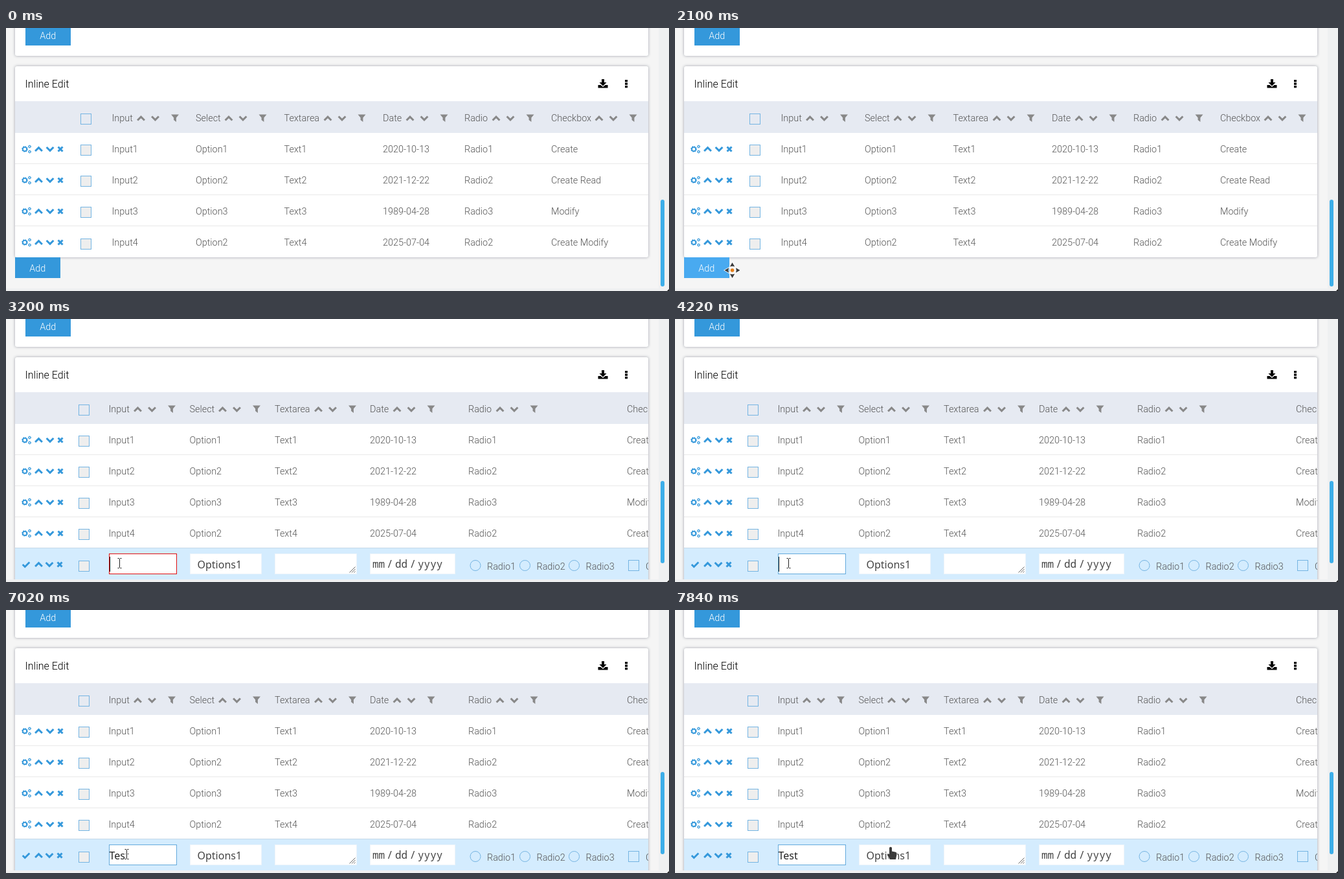
Recreate the animation shown at these times as an HTML page with a canvas. Size 1024x406 px, loop 8000 ms.

```html
<!DOCTYPE html>
<html lang="en">
<head>
<meta charset="utf-8">
<title>Inline Edit</title>
<style>
html, body { margin: 0; height: 100%; overflow: hidden; background: #f5f5f5; }
canvas { display: block; }
</style>
</head>
<body>
<canvas id="stage" width="1024" height="406"></canvas>
<script>
const ctx = document.getElementById('stage').getContext('2d');
const LOOP = 8000, BLUE = '#3498db', DARK = '#3b3b3b';
const LIGHT = '300 14.4px Roboto, sans-serif';
const FIELD = '16px "Noto Sans", sans-serif';
const MONO = '16px "Noto Sans Mono", monospace';

const heads = ['Input', 'Select', 'Textarea', 'Date', 'Radio', 'Checkbox'];
const rows = [
  ['Input1', 'Option1', 'Text1', '2020-10-13', 'Radio1', 'Create'],
  ['Input2', 'Option2', 'Text2', '2021-12-22', 'Radio2', 'Create Read'],
  ['Input3', 'Option3', 'Text3', '1989-04-28', 'Radio3', 'Modify'],
  ['Input4', 'Option2', 'Text4', '2025-07-04', 'Radio2', 'Create Modify']
];
const wideCols = [163.5, 293, 429.5, 582, 708, 842];
const editCols = [158.5, 283.5, 415, 562, 714, 959];
const sortGap = [45, 51, 67.5, 42, 49, 74];
const typing = [[4920, 'T'], [5720, 'Te'], [6020, 'Tes'], [6300, 'Test']];

const clamp = p => Math.max(0, Math.min(1, p));
const span = (t, a, b) => clamp((t - a) / (b - a));
const mix = (a, b, p) => a + (b - a) * p;

function text(s, x, y, font = LIGHT, color = '#555') {
  ctx.font = font;
  ctx.fillStyle = color;
  ctx.fillText(s, x, y);
}
function rect(x, y, w, h, fill) {
  ctx.fillStyle = fill;
  ctx.fillRect(x, y, w, h);
}
function box(x, y, w, h, fill, line) {
  rect(x, y, w, h, fill);
  ctx.strokeStyle = line;
  ctx.lineWidth = 1;
  ctx.strokeRect(x + .5, y + .5, w - 1, h - 1);
}
function shape(d, x, y, fill, line, width = 1) {
  const path = new Path2D(d);
  ctx.save();
  ctx.translate(x, y);
  if (line) {
    ctx.strokeStyle = line;
    ctx.lineWidth = width;
    ctx.stroke(path);
  }
  if (fill) {
    ctx.fillStyle = fill;
    ctx.fill(path);
  }
  ctx.restore();
}
function ring(x, y, r, line, width, dash = []) {
  ctx.beginPath();
  ctx.arc(x, y, r, 0, 7);
  ctx.setLineDash(dash);
  ctx.strokeStyle = line;
  ctx.lineWidth = width;
  ctx.stroke();
  ctx.setLineDash([]);
}
function card(y, h) {
  ctx.save();
  ctx.shadowColor = 'rgba(40,45,70,.42)';
  ctx.shadowBlur = 4;
  ctx.fillStyle = '#fff';
  ctx.beginPath();
  ctx.roundRect(14, y, 978, h, 3);
  ctx.fill();
  ctx.restore();
}
function button(x, y, fill) {
  rect(x, y, 70, 32, fill);
  text('Add', x + 22.3, y + 22, LIGHT, '#fff');
}

const up = (x, y, c) => shape('M-5.4 3L0-2.4 5.4 3', x, y, null, c, 3);
const down = (x, y, c) => shape('M-5.4-3L0 2.4 5.4-3', x, y, null, c, 3);
const cross = (x, y) => shape('M-3.5-3.5L3.5 3.5M3.5-3.5L-3.5 3.5', x, y, null, BLUE, 3);
const funnel = (x, y) => shape('M-6-5.5H6L1.9-.5V6L-1.9 3V-.5Z', x, y, '#888');
const check = (x, y) => box(x - 8.5, y - 8.5, 17, 17, '#eee', '#74b4e2');

function gear(x, y, r, width, teeth) {
  ring(x, y, r, BLUE, width);
  const step = 2 * Math.PI * (r + width / 2) / teeth;
  ring(x, y, r + width / 2, BLUE, width * .9, [step / 2, step / 2]);
}
function actions(y, editing) {
  if (editing) shape('M-5.3 0L-1.7 3.6 5.3-3.4', 31, y, null, BLUE, 2.8);
  else {
    gear(29, y, 3.1, 1.8, 8);
    gear(36.5, y - 4, 1.5, 1.1, 6);
    gear(36.5, y + 4, 1.5, 1.1, 6);
  }
  up(50.5, y, BLUE);
  down(68 - editing, y, BLUE);
  cross(84 - editing, y);
}

function table(editing) {
  const cols = editing ? editCols : wideCols;
  const checkX = editing ? 120.5 : 123.5;
  rect(14, 113, 978, 49, '#e6eaf2');
  box(checkX - 8.5, 132, 17, 17, '#e6eaf2', '#74b4e2');
  heads.forEach((name, i) => {
    const x = cols[i] + sortGap[i];
    text(name, cols[i], 144, LIGHT, '#555');
    up(x, 139.5, '#888');
    down(x + 22, 139.5, '#888');
    funnel(x + 52.5, 139);
  });
  rows.forEach((row, r) => {
    const y = 187 + 48 * r;
    if (r < 3) rect(14, y + 22, 978, 1, '#e9e9e9');
    actions(y, 0);
    check(checkX, y + (r === 3 && !editing ? 2.5 : 1.5));
    row.forEach((s, i) => text(s, cols[i], y + 5));
  });
}

function editRow(t) {
  rect(14, 353, 978, 49, '#d4ecfe');
  rect(14, 353, 978, 1, '#c6d9e8');
  actions(379, 1);
  check(120.5, 381.5);

  const p = span(t, 3200, 4220), e = p * p * (3 - 2 * p);
  const q = Math.sqrt(e) * .4 + e * .6;
  const edge = `rgb(${mix(224, 100, q)},${mix(16, 170, q)},${mix(16, 220, q)})`;
  box(159, 362, 105, 32, '#fff', edge);
  const typed = typing.reduce((s, [at, word]) => t >= at ? word : s, '');
  text(typed, 159.5, 385, FIELD, '#222');
  if (t >= 3200 && t < 6460) {
    rect(160 + Math.round(ctx.measureText(typed).width - (typed ? 1 : 0)), 367, 1, 23, '#111');
  }

  for (const [x, w] of [[284, 111], [415, 127], [562, 132]]) box(x, 362, w, 32, '#fff', '#edf4fa');
  text('Options1', 295.5, 385, FIELD, '#444');
  shape('M-9 0L0-9M-5.5 0L0-5.5M-2 0L0-2', 539.5, 391.5, null, '#666', 1);
  [['mm', 566], ['/', 588], ['dd', 601], ['/', 623.5], ['yyyy', 636]]
    .forEach(([s, x]) => text(s, x, 384, MONO, '#444'));
  [725, 801.5, 877.5].forEach((x, i) => {
    ring(x, 380.5, 8, '#74b4e2', 1);
    text('Radio' + (i + 1), x + 18, 387);
  });
  box(961, 372, 17, 17, '#d4ecfe', '#74b4e2');
  text('Create', 988, 387);
}

const cursors = {
  arrow(x, y) {
    shape('M0 0V16L4 12.5 6.5 18 9 17 6.5 11.5H12Z', x, y, DARK, '#fff', 2);
  },
  move(x, y) {
    for (let i = 0; i < 4; i++) {
      ctx.save();
      ctx.translate(x, y);
      ctx.rotate(i * Math.PI / 2);
      shape('M0-12L3.8-5.5Q0-7 -3.8-5.5Z', 0, 0, DARK, '#fff', 1.5);
      ctx.restore();
    }
    ctx.beginPath();
    ctx.arc(x, y, 2.8, 0, 7);
    ctx.fillStyle = '#e67e17';
    ctx.fill();
  },
  beam(x, y) {
    const d = 'M-3-7.5H-1L0-6.5 1-7.5H3M0-6.5V6.5M-3 7.5H-1L0 6.5 1 7.5H3';
    shape(d, x, y, null, '#fff', 3);
    shape(d, x, y, null, '#222', 1);
  },
  hand(x, y) {
    shape('M-2 1.5Q0-1 2 1.5V7L8 8.3Q10 9 9.5 12L8 19.5H-1L-5 13Q-5.5 9.5-2 11.5Z',
      x, y - 9.5, DARK, '#fff', 1.5);
  }
};

function pointer(t) {
  if (t < 1240) return;
  if (t < 2100) return cursors.arrow(57, mix(402, 393, span(t, 1240, 1280)));
  let x = 88.5, y = 374;
  if (t >= 2120) {
    const p = span(t, 2200, 2540);
    x = mix(108.5, 175.5, 1 - (1 - p) ** 2);
    y = 377;
  }
  if (t >= 7020) {
    const p = span(t, 7120, 7720);
    x = mix(186.5, 328, p);
    y = mix(377, 376, p) + 12 * Math.sin(Math.PI * p);
  }
  if (t >= 7840) [x, y] = [333, 375];
  const kind = x >= 284 ? 'hand' : x >= 159 && x < 264 ? 'beam' : 'move';
  cursors[kind](x, y);
}

function draw(t) {
  const editing = t >= 2120;
  rect(0, 0, 1024, 406, '#f5f5f5');
  card(-20, 63);
  button(30, -5, BLUE);
  card(59, editing ? 380 : 295);
  text('Inline Edit', 29.5, 92, '300 16px Roboto, sans-serif', '#000');
  shape('M-2-7H2V-2H5.5L0 3.5-5.5-2H-2ZM-7.5 2H-3.5L0 5 3.5 2H7.5V6.5H-7.5Z', 922, 86, '#000');
  for (const y of [80, 84.5, 89]) rect(956, y, 4, 3.3, '#000');

  ctx.save();
  ctx.beginPath();
  ctx.rect(14, 59, 978, 343);
  ctx.clip();
  table(editing);
  if (editing) editRow(t);
  ctx.restore();
  if (!editing) button(14, 354, t >= 2100 ? '#49aaf0' : BLUE);

  rect(1008, 0, 16, 406, '#eff0f1');
  rect(0, 402, 1024, 4, '#eff0f1');
  ctx.fillStyle = '#3daee9';
  ctx.beginPath();
  ctx.roundRect(1011, editing ? 250 : 265, 6, editing ? 127 : 134, 3);
  ctx.fill();
  shape('M0 0V-3L-3 0Z', 1024, 406, '#222');
  pointer(t);
}

const start = performance.now();
function tick() {
  draw((performance.now() - start) % LOOP);
  requestAnimationFrame(tick);
}
tick();
</script>
</body>
</html>
```
